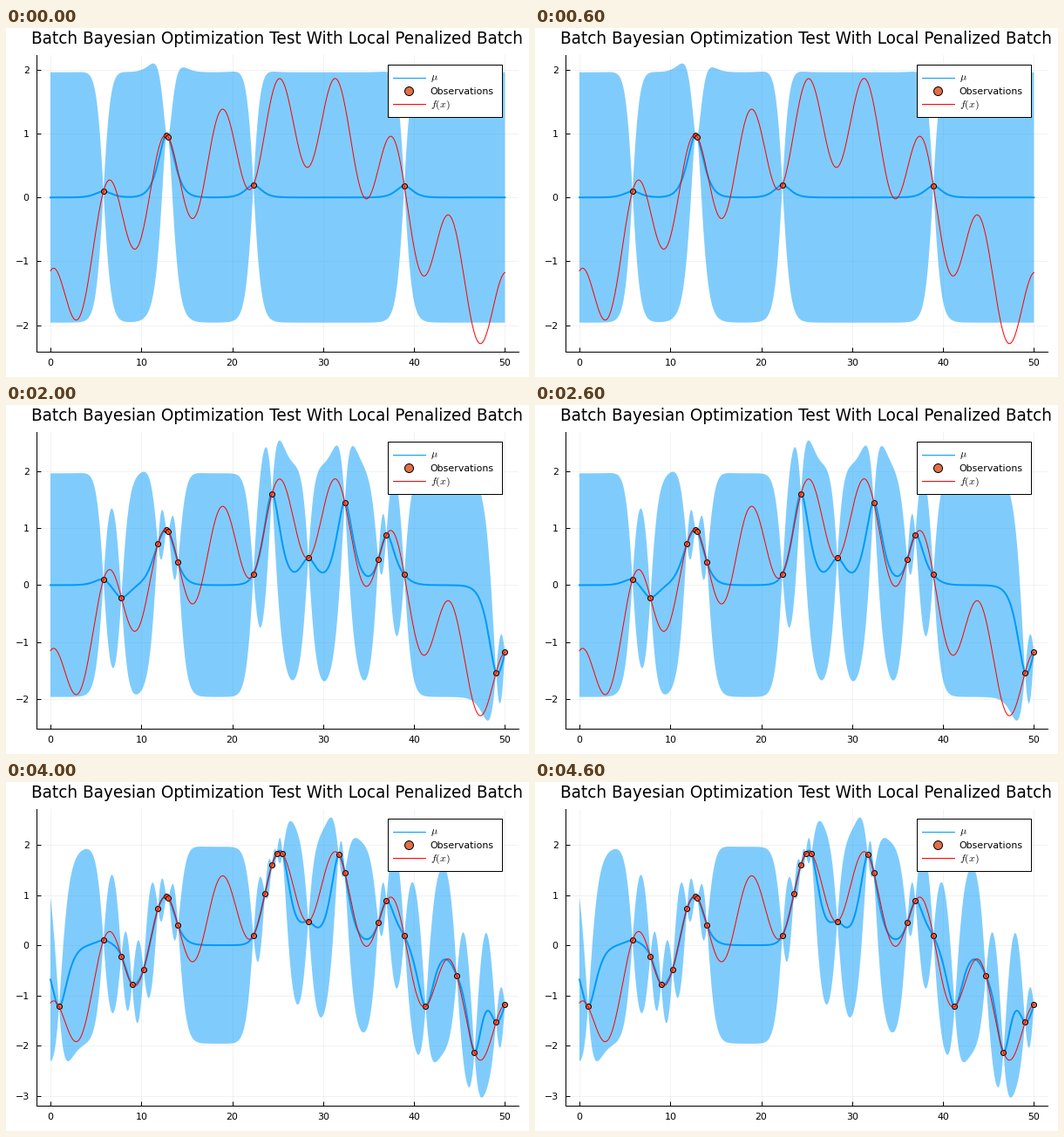
A matplotlib script for the animation above (5000 ms loop, 600 by 400 pixels).

```python
import numpy as np
import matplotlib.pyplot as plt
from matplotlib.animation import FuncAnimation
from matplotlib.patches import Rectangle
from matplotlib.ticker import MultipleLocator

W, H, DPI = 600, 400, 100
PX = 72 / DPI  # points per pixel
BLUE, ORANGE, RED = "#009AFA", "#E26F46", "#FF0000"

plt.rcParams.update({"font.family": "DejaVu Sans", "mathtext.fontset": "cm"})

# Where each optimisation step samples the objective
BATCHES = [
    (5.83, 12.76, 12.97, 22.33, 38.93),
    (7.80, 11.83, 14.03, 36.96, 49.03),
    (24.37, 28.37, 32.38, 36.08, 50.0),
    (10.24, 24.90, 31.71, 41.28, 44.71),
    (0.94, 8.98, 23.60, 25.53, 46.65),
]


def f(x):
    return (3 * np.sin(np.pi * x / 50) + 0.25 * np.sin(2 * np.pi * x / 25)
            + 0.75 * np.cos(x) - 1.9)


def matern52(a, b):
    r = np.sqrt(5) * np.abs(a[:, None] - b[None, :])
    return (1 + r + r**2 / 3) * np.exp(-r)


def posterior(x, xo):
    gram = matern52(xo, xo) + 1e-8 * np.eye(len(xo))
    cross = matern52(x, xo)
    gain = np.linalg.solve(gram, cross.T).T
    var = 1 - np.sum(gain * cross, axis=1)
    return gain @ f(xo), np.sqrt(np.clip(var, 0, None))


xs = np.linspace(0, 50, 1001)
fx = f(xs)

fig = plt.figure(figsize=(W / DPI, H / DPI), dpi=DPI, facecolor="white")
L, R, T, B = 35.4, 588, 31, 371.4
ax = fig.add_axes([L / W, 1 - B / H, (R - L) / W, (B - T) / H])
ax.set_xlim(-1.5, 51.5)
ax.xaxis.set_major_locator(MultipleLocator(10))
ax.yaxis.set_major_locator(MultipleLocator(1))
ax.set_axisbelow(True)
ax.grid(color="black", alpha=0.05, lw=PX)
ax.tick_params(direction="in", length=5 * PX, width=PX, labelsize=11 * PX)
ax.tick_params(axis="x", pad=8 * PX)
ax.tick_params(axis="y", pad=8.7 * PX)
for side, spine in ax.spines.items():
    spine.set_visible(side in ("left", "bottom"))
    spine.set_linewidth(PX)

band, = ax.fill([0, 1, 1], [0, 0, 1], color=BLUE, alpha=0.5, lw=0, zorder=2)
mean, = ax.plot([], [], color=BLUE, lw=2 * PX, zorder=3)
dots, = ax.plot([], [], "o", mfc=ORANGE, mec="black", ms=6 * PX, mew=PX, zorder=4)
ax.plot(xs, fx, color=RED, lw=PX, zorder=5)

# Title and legend in pixel coordinates
ov = fig.add_axes([0, 0, 1, 1], zorder=5)
ov.set(xlim=(0, W), ylim=(H, 0))
ov.axis("off")


def label(x, y, text, size, ha="left"):
    ov.text(x, y, text, fontsize=size * PX, ha=ha, va="baseline")


label(311.4, 17.6, "Batch Bayesian Optimization Test With Local Penalized Batch",
      18.55, "center")
ov.add_patch(Rectangle((438, 42), 131.2, 60.2, fc="white", ec="black", lw=PX))
for y, color in ((57.2, BLUE), (87.2, RED)):
    ov.plot([444, 481], [y, y], color=color, lw=PX)
ov.plot([462.2], [72.2], "o", mfc=ORANGE, mec="black", ms=10 * PX, mew=PX)
label(487, 59.5, r"$\mu$", 11.8)
label(486.8, 76.5, "Observations", 11)
label(487, 90.5, "$f(x)$", 11.8)


def draw(step):
    xo = np.concatenate(BATCHES[:step + 1])
    mu, sd = posterior(xs, xo)
    low, high = mu - 1.96 * sd, mu + 1.96 * sd
    band.set_xy(np.column_stack([np.r_[xs, xs[::-1]], np.r_[high, low[::-1]]]))
    mean.set_data(xs, mu)
    dots.set_data(xo, f(xo))
    bottom, top = min(low.min(), fx.min()), max(high.max(), fx.max())
    pad = 0.03 * (top - bottom)
    ax.set_ylim(bottom - pad, top + pad)
    return band, mean, dots


anim = FuncAnimation(fig, draw, frames=len(BATCHES), interval=1000,
                     repeat=True, repeat_delay=0, blit=False)
plt.show()
```
